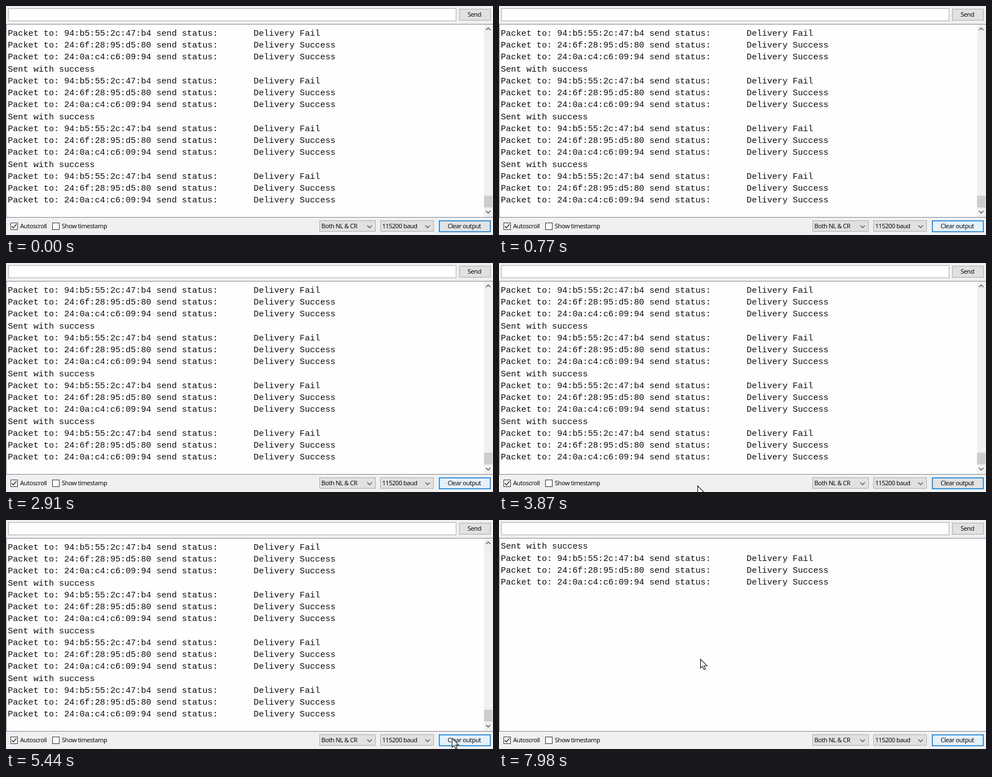
These frames come from a looping animation (864x408 px, 8 s). An HTML page with a canvas:

```html
<!DOCTYPE html>
<html lang="en">
<head>
<meta charset="utf-8">
<title>Serial monitor</title>
<style>
  html, body { margin: 0; width: 100%; height: 100%; overflow: hidden; background: #f0f0f0; }
  canvas { display: block; }
</style>
</head>
<body>
<canvas id="stage" width="864" height="408"></canvas>
<script>
const ctx = document.getElementById('stage').getContext('2d');

const LOOP = 8000;
const CLEAR = 5750;      // output is emptied
const REFILL = 6200;     // next report arrives
const HOVER = [4800, 5950];

const PANEL = '#f0f0f0', PAPER = '#fefefe', FACE = '#e1e1e1', EDGE = '#adadad', INK = '#0c0c0c';
const MONO = '15.15px "Liberation Mono", monospace';
const UI = '11px "Noto Sans", "Open Sans", sans-serif';

const status = (mac, result) => `Packet to: ${mac} send status:`.padEnd(48) + 'Delivery ' + result;
const packets = [
  status('94:b5:55:2c:47:b4', 'Fail'),
  status('24:6f:28:95:d5:80', 'Success'),
  status('24:0a:c4:c6:09:94', 'Success')
];
const report = ['Sent with success', ...packets];
const history = [...packets, ...report, ...report, ...report];

// time, x, y of the pointer tip
const path = [
  [3770, 352, 410], [3870, 352, 397], [4200, 430, 368], [4800, 791, 389],
  [5850, 791, 389], [6450, 357, 248]
];

function box(x, y, w, h, fill, edge, line = 1) {
  ctx.fillStyle = edge;
  ctx.fillRect(x, y, w, h);
  ctx.fillStyle = fill;
  ctx.fillRect(x + line, y + line, w - 2 * line, h - 2 * line);
}

function stroke(points, color = '#333', width = 1.2) {
  ctx.beginPath();
  points.forEach(([x, y]) => ctx.lineTo(x, y));
  ctx.strokeStyle = color;
  ctx.lineWidth = width;
  ctx.stroke();
}

function chevron(x, y, dir, color) {
  stroke([[x - 4, y - 2 * dir], [x, y + 2 * dir], [x + 4, y - 2 * dir]], color, 1.4);
}

function label(text, x, y, align = 'left') {
  ctx.font = UI;
  ctx.letterSpacing = '-0.45px';
  ctx.textAlign = align;
  ctx.fillStyle = INK;
  ctx.fillText(text, x, y);
}

function checkbox(x, text, checked) {
  box(x, 386, 13, 13, PAPER, '#333');
  if (checked) stroke([[x + 2.5, 392.5], [x + 5, 395.5], [x + 10.5, 389]], '#222', 1.4);
  label(text, x + 17, 396);
}

function combo(x, w, text) {
  box(x, 382, w, 20, FACE, EDGE);
  label(text, x + 3.5, 396);
  chevron(x + w - 11, 393, 1, '#555');
}

function printLines(lines, y) {
  ctx.font = MONO;
  ctx.letterSpacing = '0px';
  ctx.textAlign = 'left';
  ctx.fillStyle = INK;
  lines.forEach((line, i) => ctx.fillText(line, 3.2, y + i * 21.23));
}

function scrollbar() {
  ctx.fillStyle = PANEL;
  ctx.fillRect(848, 33, 16, 343);
  ctx.fillStyle = '#cdcdcd';
  ctx.fillRect(848, 338, 15, 21);
  chevron(855.5, 41, -1, '#505050');
  chevron(855.5, 367, 1, '#505050');
}

// The focused button pulses between its plain and its hot look.
function clearButton(t) {
  const hot = t >= HOVER[0] && t < HOVER[1];
  const peak = t < HOVER[1] ? 770 : 7980;
  const glow = hot ? 1 : 0.5 + 0.5 * Math.cos((t - peak) * Math.PI / 1000);
  const mix = (a, b) => Math.round(a + (b - a) * glow);
  const fill = `rgb(${mix(225, 229)},${mix(225, 241)},${mix(225, 251)})`;
  box(768, 382, 92, 21, fill, '#0078d7', 1.5);
  label('Clear output', 813, 396, 'center');
}

function pointer(t) {
  if (t < path[0][0]) return;
  let i = 0;
  while (i < path.length - 2 && t >= path[i + 1][0]) i++;
  const [t0, x0, y0] = path[i], [t1, x1, y1] = path[i + 1];
  const p = Math.min(1, (t - t0) / (t1 - t0));
  const e = p * p * (3 - 2 * p);
  ctx.save();
  ctx.translate(x0 + (x1 - x0) * e + 0.5, y0 + (y1 - y0) * e);
  const arrow = new Path2D('M0 0V16L3.7 12.6L6.2 18.5L8.8 17.4L6.3 11.7H11.5Z');
  ctx.fillStyle = '#fff';
  ctx.fill(arrow);
  ctx.strokeStyle = '#111';
  ctx.lineWidth = 1.1;
  ctx.stroke(arrow);
  ctx.restore();
}

function draw(t) {
  ctx.fillStyle = PANEL;
  ctx.fillRect(0, 0, 864, 408);

  box(4, 4, 795, 23, PAPER, EDGE);
  box(804, 5, 56, 21, FACE, EDGE);
  label('Send', 831, 19, 'center');

  box(0, 32, 865, 345, PAPER, '#828790');
  if (t < CLEAR) {
    printLines(history, 53);
    scrollbar();
  } else if (t >= REFILL) {
    printLines(report, 51.3);
  }

  checkbox(8, 'Autoscroll', true);
  checkbox(82, 'Show timestamp', false);
  combo(556, 100, 'Both NL & CR');
  combo(664, 95, '115200 baud');
  clearButton(t);
  pointer(t);
}

const start = performance.now();
function tick() {
  draw((performance.now() - start) % LOOP);
  requestAnimationFrame(tick);
}
tick();
</script>
</body>
</html>
```
